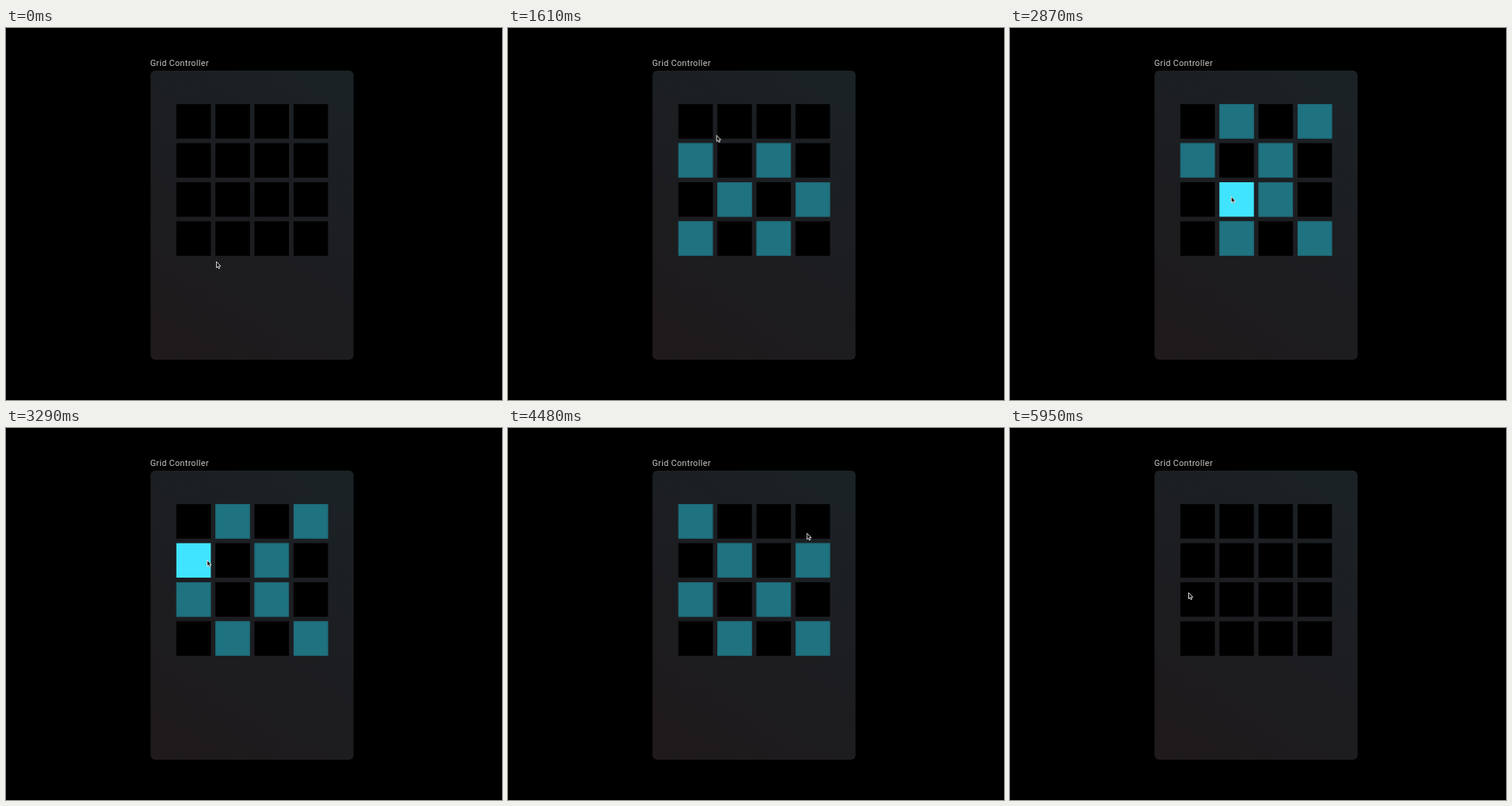
These frames come from a looping animation (640 px wide and 480 px high, 6300 ms). An HTML page with a canvas:

```html
<!DOCTYPE html>
<html lang="en">
<head>
<meta charset="utf-8">
<title>Grid Controller</title>
<style>
  html, body { margin: 0; width: 100%; height: 100%; overflow: hidden; background: #000; }
  canvas { display: block; }
  .label {
    position: absolute; left: 186px; top: 39px; white-space: pre;
    font: 11px/14px Roboto, "Open Sans", sans-serif;
    letter-spacing: 0.33px; color: #c6c6c6;
  }
</style>
</head>
<body>
<canvas id="stage" width="640" height="480"></canvas>
<div class="label">Grid Controller</div>
<script>
const ctx = document.getElementById('stage').getContext('2d');
const LOOP = 6300, STEP = 70;
const SIZE = 44.5, PITCH = 50.4, LEFT = 219.8, TOP = 98.2;

// Pointer stops: time, x, y and, for a press, how long it is held.
const stop = (t, x, y, hold = 0) => ({ t, x, y, hold });
const click = (t, x, y) => stop(t, x, y, STEP);

// Drag across one row, pressing every cell on the way.
const sweep = (t, y, x0, dx, cols, every, lastHold = every) =>
  cols.map((c, i) => stop(t + i * every, x0 + dx * c, y, i === 3 ? lastHold : every));

const right = [0, 1, 2, 3], left = [3, 2, 1, 0];
const path = [
  stop(350, 271, 301),
  click(560, 243, 268),
  click(700, 291, 222),
  click(840, 341, 265),
  stop(980, 353, 223),
  click(1120, 401, 218),
  click(1260, 342, 172),
  click(1470, 226, 170),
  click(1680, 290, 122),
  click(1820, 400, 118),
  stop(2030, 345, 182),
  stop(2240, 275, 257),
  ...sweep(2450, 268, 230, 57, right, 70),
  ...sweep(2730, 217, 224, 61, left, 70, 210),
  stop(3010, 224, 214),
  stop(3080, 224, 214),
  ...sweep(3220, 170, 232, 54, right, 140),
  ...sweep(3780, 103, 232, 49, left, 70, 210),
  stop(4130, 232, 103),
  click(4340, 338, 104),
  stop(4550, 409, 151),
  stop(4620, 409, 151),
  click(4830, 292, 170),
  click(4970, 242, 122),
  stop(5180, 376, 180),
  click(5250, 399, 177),
  stop(5320, 372, 216),
  click(5390, 345, 222),
  click(5530, 399, 268),
  click(5670, 292, 270),
  stop(5810, 234, 220, 140),
  stop(5950, 230, 212)
];

const presses = path.filter(p => p.hold);
for (const p of presses) {
  p.col = Math.floor((p.x - LEFT) / PITCH);
  p.row = Math.floor((p.y - TOP) / PITCH);
}

function pointerAt(t) {
  const i = path.findIndex(p => p.t > t);
  if (i < 0) return path[path.length - 1];
  if (i === 0) return path[0];
  const a = path[i - 1], b = path[i], k = (t - a.t) / (b.t - a.t);
  return { x: a.x + (b.x - a.x) * k, y: a.y + (b.y - a.y) * k };
}

const shade = ctx.createLinearGradient(205, 415, 430, 68);
shade.addColorStop(0, '#1f1a1c');
shade.addColorStop(0.3, '#1d1c1f');
shade.addColorStop(0.6, '#1c1e22');
shade.addColorStop(1, '#1b2225');

function drawPanel() {
  ctx.fillStyle = shade;
  ctx.beginPath();
  ctx.roundRect(186.5, 55, 262, 373, 6);
  ctx.fill();
}

function drawRipple(p, t) {
  const k = (t - p.t) / 140;
  if (k < 0 || k >= 1) return;
  ctx.strokeStyle = `rgba(64, 228, 255, ${0.7 - 0.4 * k})`;
  ctx.lineWidth = 1.2;
  ctx.beginPath();
  ctx.arc(p.x + 5.5, p.y + 1, 9.5 + 6 * k, 0, Math.PI * 2);
  ctx.stroke();
}

function drawCell(row, col, t) {
  const past = presses.filter(p => p.row === row && p.col === col && p.t <= t);
  const held = past.some(p => t < p.t + p.hold);
  const on = past.length % 2 === 1;
  const x = LEFT + col * PITCH, y = TOP + row * PITCH;
  ctx.fillStyle = held ? '#40e4ff' : on ? '#1f7280' : '#000';
  ctx.fillRect(x, y, SIZE, SIZE);
  if (on && !held) {
    ctx.strokeStyle = '#1d6773';
    ctx.lineWidth = 1;
    ctx.strokeRect(x + 0.5, y + 0.5, SIZE - 1, SIZE - 1);
  }
}

const arrow = new Path2D('M.5 .5V8.3L2.2 6.8L3.5 9.5L4.8 8.9L3.6 6.2H6Z');

function drawPointer({ x, y }) {
  ctx.save();
  ctx.translate(x, y);
  ctx.fillStyle = '#111';
  ctx.strokeStyle = '#e8e8e8';
  ctx.lineWidth = 0.9;
  ctx.fill(arrow);
  ctx.stroke(arrow);
  ctx.restore();
}

function draw(now) {
  const t = Math.floor((now % LOOP) / STEP) * STEP;
  ctx.fillStyle = '#000';
  ctx.fillRect(0, 0, 640, 480);
  drawPanel();
  presses.forEach(p => drawRipple(p, t));
  for (let i = 0; i < 16; i++) drawCell(i >> 2, i & 3, t);
  drawPointer(pointerAt(t));
}

let start;
function tick(now) {
  start ??= now;
  draw(now - start);
  requestAnimationFrame(tick);
}
draw(0);
requestAnimationFrame(tick);
</script>
</body>
</html>
```
